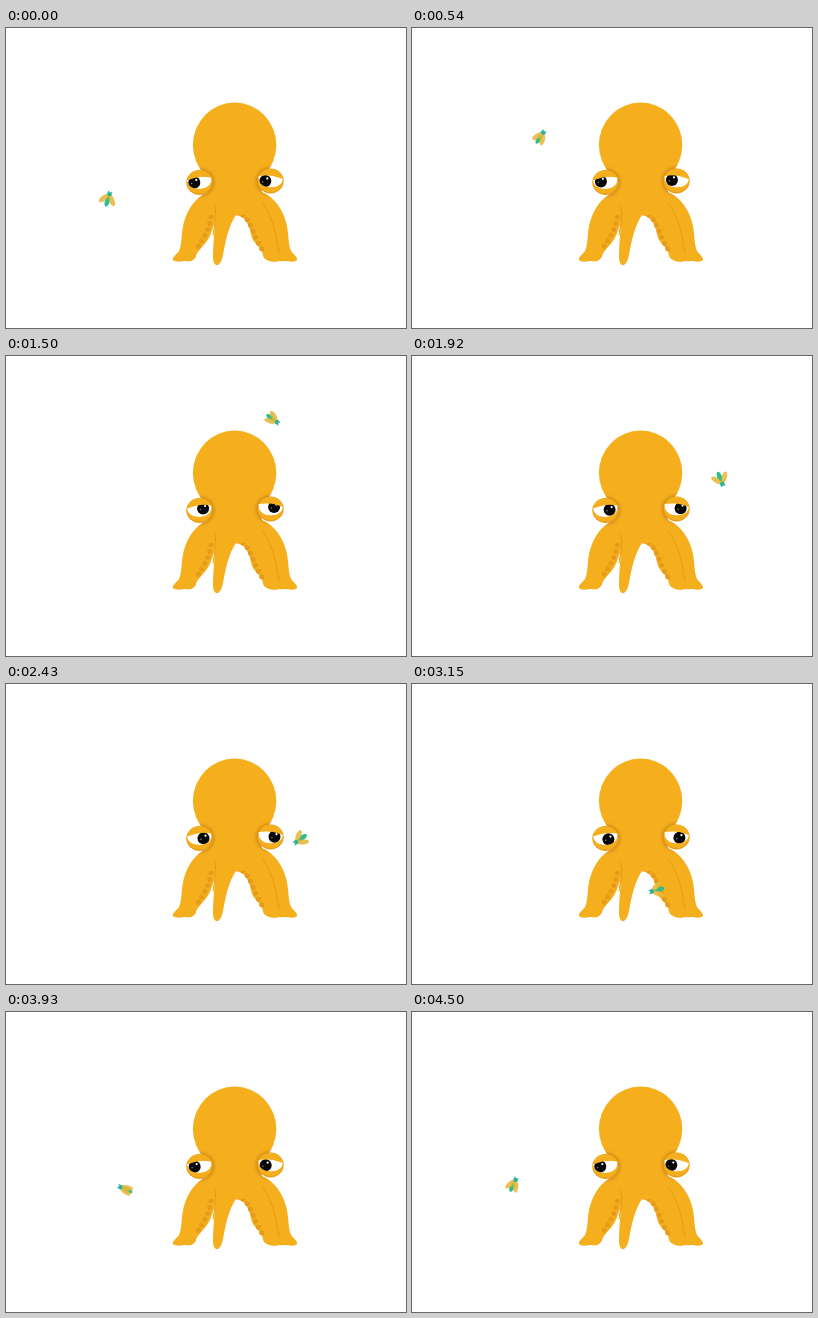
An HTML page with a canvas for the animation above (4530 ms loop, 400x300 px).

```html
<!DOCTYPE html>
<html lang="en">
<head>
<meta charset="utf-8">
<title>Octopus watching a fly</title>
<style>
html, body { margin: 0; height: 100%; overflow: hidden; background: #fff; }
canvas { display: block; }
</style>
</head>
<body>
<canvas id="stage" width="400" height="300"></canvas>
<script>
const ctx = document.getElementById('stage').getContext('2d');
const LOOP = 4530, FLAP = 240, MIDDLE = 229;
const ORANGE = '#f5af1d', SHADE = '#e79a1b';

// Evenly timed points of the closed flight path
const route = [
  [102, 171], [125, 114], [189, 42], [268, 64], [312, 134],
  [289, 160], [258, 201], [196, 207], [107, 172]
];

const neck = new Path2D('M192 137C205 147 206 158 200 167L210 192L229 187H250L258 167C252 158 253 147 266 137Z');
const outerLeg = new Path2D('M208 162C193 166 185 176 180 188C174 203 177 214 173 223C171 226 166 229 167 232C170 235 176 233 180 233C185 234 189 232 190 228C192 222 197 219 201 213C206 206 207 198 211 187Z');
const innerLeg = new Path2D('M229 187C238 188 243 195 245 206C246 216 257 219 257 228C259 234 273 236 274 231C271 224 274 214 271 205C267 192 263 181 250 177Z');
const middleLeg = new Path2D('M208 180C210 195 207 212 207 229C207 234 209 238 212 237C217 234 217 224 220 212C223 200 226 193 230 187L228 172Z');
const suckers = new Path2D('M205 189C203 202 198 210 189 223M237 187C246 194 246 207 259 226');
const creases = new Path2D('M209 178C211 188 208 199 207 207M257 176C268 191 270 209 273 225');
const eyeOpening = new Path2D('M-12.5 -2Q0 -7.5 12 -5C13 3 6 6.5 0 6.5C-7 6.5 -12 3 -12.5 -2Z');

function flyAt(t) {
  const n = route.length, s = (t / LOOP + 1) % 1 * n, i = Math.floor(s), u = s - i;
  const [a, b, c, d] = [-1, 0, 1, 2].map(k => route[(i + k + n) % n]);
  return [0, 1].map(k => b[k] + u / 2 * (c[k] - a[k]
    + u * (2 * a[k] - 5 * b[k] + 4 * c[k] - d[k]
    + u * (3 * (b[k] - c[k]) + d[k] - a[k]))));
}

function fill(path, color) {
  ctx.fillStyle = color;
  ctx.fill(path);
}

function oval(x, y, rx, ry, color) {
  ctx.beginPath();
  ctx.ellipse(x, y, rx, ry, 0, 0, 2 * Math.PI);
  ctx.fillStyle = color;
  ctx.fill();
}

function line(path, width, dash) {
  ctx.strokeStyle = SHADE;
  ctx.lineWidth = width;
  ctx.setLineDash(dash);
  ctx.stroke(path);
}

function body() {
  ctx.lineCap = 'round';
  fill(outerLeg, ORANGE);
  ctx.save();
  ctx.translate(2 * MIDDLE, 0);
  ctx.scale(-1, 1);
  fill(outerLeg, ORANGE);
  ctx.restore();
  fill(innerLeg, ORANGE);
  line(suckers, 5, [0, 6.5]);
  oval(MIDDLE - .4, 117, 41.7, 42.5, ORANGE);
  fill(neck, ORANGE);
  fill(middleLeg, ORANGE);
  line(creases, 1, []);
}

function eye(x, y, side, gazeX, gazeY) {
  ctx.save();
  ctx.translate(x, y);
  // The soft shadow falls on the body only
  ctx.globalCompositeOperation = 'source-atop';
  ctx.shadowColor = '#a85f08';
  ctx.shadowBlur = 5;
  oval(0, 0, 13, 12.2, SHADE);
  ctx.shadowBlur = 0;
  ctx.globalCompositeOperation = 'source-over';
  oval(0, 0, 13.2, 12.4, SHADE);
  oval(0, -.5, 12.6, 11.7, ORANGE);
  ctx.scale(side, 1);
  ctx.clip(eyeOpening);
  fill(eyeOpening, '#fff');
  ctx.scale(side, 1);
  ctx.translate(gazeX + .5, gazeY);
  oval(0, 0, 6, 6, '#080808');
  oval(2, -2.6, 1.1, 1.1, '#fff');
  oval(-2.6, 1, .7, .7, '#8b9998');
  ctx.restore();
}

function fly(x, y, heading, t) {
  const spread = .38 + .25 * Math.cos(t / FLAP * 2 * Math.PI);
  ctx.save();
  ctx.translate(x, y);
  ctx.rotate(heading);
  oval(-2.5, 0, 5.5, 2.4, '#2fbd8c');
  for (const side of [-1, 1]) {
    ctx.save();
    ctx.translate(4, side);
    ctx.rotate(-side * spread);
    oval(-5.5, 0, 6, 2.6, '#e6b83be0');
    ctx.restore();
  }
  oval(5, 0, 2, 2.4, '#2fae98');
  for (const side of [-1, 1]) oval(7, 1.6 * side, 1, .7, '#31bfb0');
  ctx.restore();
}

function draw() {
  const t = performance.now() % LOOP;
  const [x, y] = flyAt(t), [nextX, nextY] = flyAt(t + 5);
  const gazeX = 5 * Math.tanh((x - 190) / 60) - 1.2;
  const gazeY = (y - 168) / 55;
  ctx.clearRect(0, 0, 400, 300);
  body();
  eye(193.5, 154.5, 1, gazeX, gazeY);
  eye(264.5, 153, -1, gazeX, gazeY);
  fly(x, y, Math.atan2(nextY - y, nextX - x), t);
  requestAnimationFrame(draw);
}
draw();
</script>
</body>
</html>
```
